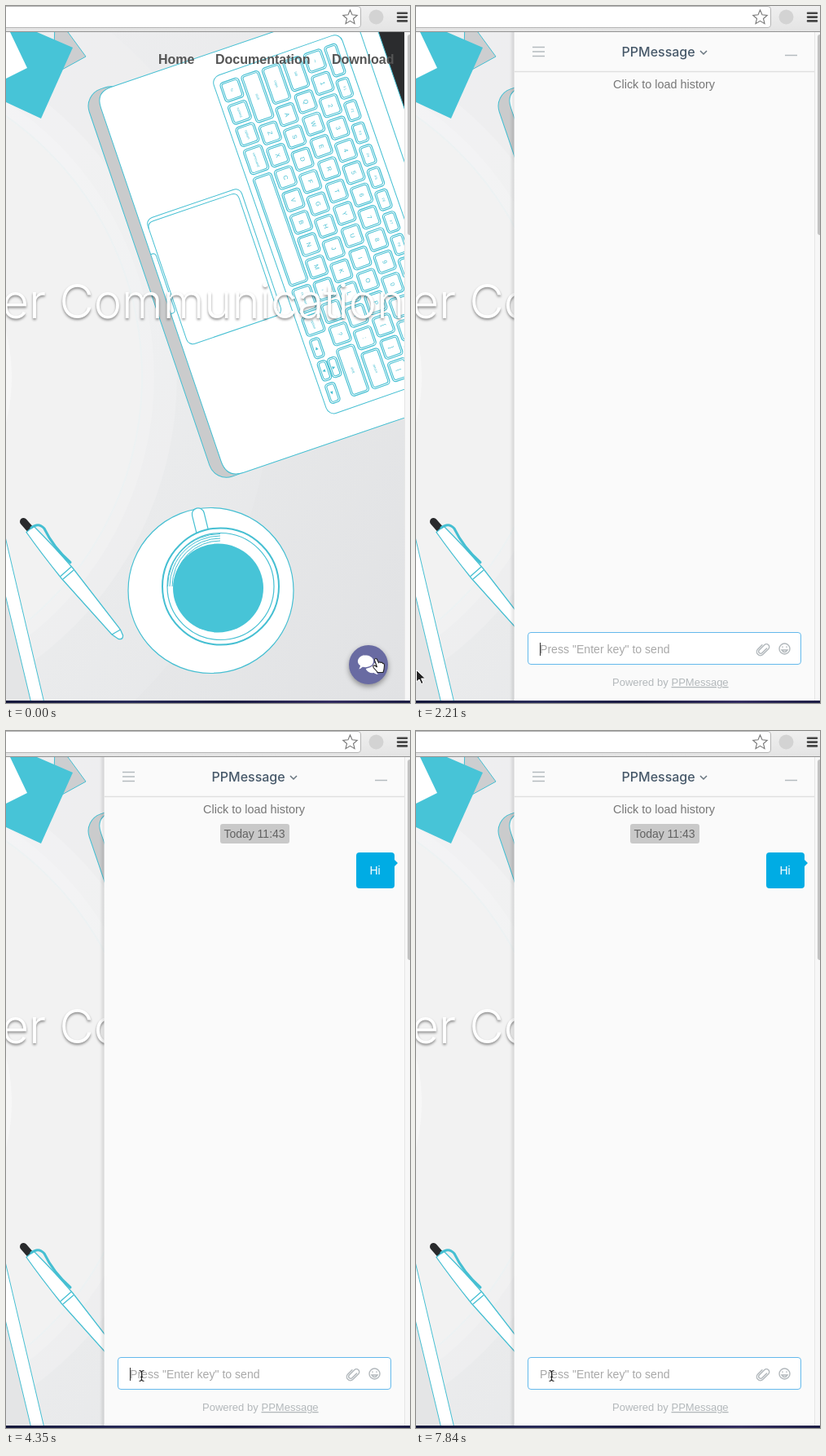
Recreate the animation shown at these times as an HTML page. Size 496 by 855 pixels, loop 8 s.

```html
<!DOCTYPE html>
<html lang="en">
<head>
<meta charset="utf-8">
<title>Chat widget</title>
<style>
html, body { margin: 0; width: 100%; height: 100%; overflow: hidden; background: #fff; }
svg { display: block; width: 100vw; height: 100vh; font-family: "Liberation Sans", Arial, sans-serif; font-size: 14px; }
.line { fill: none; stroke: #45bfd2; }
.paper { fill: #fff; stroke: #45bfd2; }
.nav { font-weight: bold; font-size: 16px; fill: #555; }
.hero { font: 300 58px Inter, "Liberation Sans", sans-serif; fill: #fff; filter: drop-shadow(0 2px 1.5px rgba(0,0,0,.42)); }
.brand { font: 500 16px Inter, "Liberation Sans", sans-serif; fill: #47596a; }
.label { fill: #45bfd2; text-anchor: middle; }
.icon { fill: none; stroke: #b2b8bc; stroke-width: 1.4; stroke-linecap: round; }
.mid { text-anchor: middle; }

.hand, .arrow, .beam, .panel, .picked, .chat, .hint, .caret, .key1, .key2, .sent {
  animation: 8s step-end infinite;
}
.hand { animation-name: hand; }
.arrow { animation-name: arrow; }
.beam { animation-name: beam; }
.panel { animation-name: panel; }
.picked { animation-name: picked; }
.chat { animation-name: chat; }
.hint { animation-name: hint; }
.caret { animation-name: caret; }
.key1 { animation-name: key1; }
.key2 { animation-name: key2; }
.sent { animation-name: sent; }

@keyframes hand {
  0% { opacity: 1; transform: none; }
  13.5% { opacity: 1; transform: translate(-2px, 2px); }
  21%, 100% { opacity: 0; }
}
@keyframes arrow {
  0% { opacity: 0; }
  24.25% { opacity: 1; transform: translate(-8px, 830px); }
  27.625% { opacity: 1; transform: translate(0, 814px); }
  30.875% { opacity: 1; transform: translate(91px, 795px); }
  34.25%, 100% { opacity: 0; }
}
@keyframes beam {
  0% { opacity: 0; }
  34.25% { opacity: 1; transform: translate(0, 2px); }
  37.625%, 100% { opacity: 1; transform: none; }
}
@keyframes panel { 0% { opacity: 0; } 24.25%, 100% { opacity: 1; } }
@keyframes picked { 0% { opacity: 1; } 27.625%, 100% { opacity: 0; } }
@keyframes chat { 0% { opacity: 0; } 27.625%, 100% { opacity: 1; } }
@keyframes hint { 0%, 54.375%, 100% { opacity: 1; } 47.625% { opacity: 0; } }
@keyframes key1 { 0%, 54.375%, 100% { opacity: 0; } 47.625% { opacity: 1; } }
@keyframes key2 { 0%, 54.375%, 100% { opacity: 0; } 51% { opacity: 1; } }
@keyframes sent { 0% { opacity: 0; } 54.375%, 100% { opacity: 1; } }
@keyframes caret {
  0%, 37.625%, 54.375%, 67.875%, 77.875%, 91.25% { opacity: 1; transform: none; }
  34.25%, 44.25%, 61.125%, 71.25%, 84.625%, 98%, 100% { opacity: 0; transform: none; }
  47.625% { opacity: 1; transform: translate(10px, 0); }
  51% { opacity: 1; transform: translate(13px, 0); }
}
</style>
</head>
<body>
<svg viewBox="0 0 496 855" preserveAspectRatio="none">
  <defs>
    <linearGradient id="desk" x1="0" y1="0" x2="1" y2="1">
      <stop offset="0" stop-color="#eeeef0"/><stop offset=".45" stop-color="#e9eaeb"/><stop offset="1" stop-color="#e1e2e4"/>
    </linearGradient>
    <linearGradient id="bar" x1="0" y1="0" x2="0" y2="1">
      <stop offset="0" stop-color="#efefef"/><stop offset="1" stop-color="#e4e4e4"/>
    </linearGradient>
    <linearGradient id="dock">
      <stop offset="0" stop-color="#15183a"/><stop offset=".3" stop-color="#272a58"/><stop offset=".55" stop-color="#191a40"/><stop offset=".8" stop-color="#322c60"/><stop offset="1" stop-color="#1c1d44"/>
    </linearGradient>
    <linearGradient id="edge">
      <stop offset="0" stop-color="#000" stop-opacity="0"/><stop offset="1" stop-color="#000" stop-opacity=".13"/>
    </linearGradient>
    <clipPath id="page"><rect y="32" width="489" height="820"/></clipPath>
  </defs>

  <rect width="496" height="855" fill="#fff"/>

  <g clip-path="url(#page)">
    <rect y="32" width="489" height="820" fill="url(#desk)"/>
    <g fill="#fff">
      <circle cx="-223" cy="455" r="550" opacity=".08"/>
      <circle cx="-223" cy="455" r="433" opacity=".16"/>
      <circle cx="-223" cy="455" r="405" opacity=".14"/>
    </g>
    <circle cx="-223" cy="455" r="390" fill="#f2f2f2" stroke="#edf2f3" stroke-width="2"/>
    <circle cx="-223" cy="455" r="230" fill="#f7f7f7"/>

    <!-- sheets -->
    <path d="M60 20 76 32 98 62 58 84Z" fill="#cdced0" stroke="#45bfd2"/>
    <path d="M0 20 38 32 82 51 43 138 0 118Z" fill="#47c4d7"/>
    <path d="M0 32H5L26 76 0 89Z" fill="#fff"/>
    <path d="M0 727V852H31Z" fill="#e4e5e6"/>
    <path class="paper" d="M-1 651 46.500 853H30.500L-1 722Z"/>

    <!-- laptop -->
    <g transform="translate(110 106) rotate(-18.800)">
      <rect x="352" y="-80" width="200" height="700" fill="#2b2c2e"/>
      <rect x="-15" y="-2" width="50" height="502" rx="22" fill="#cacbcc" stroke="#45bfd2"/>
      <path class="paper" d="M352.500 0H20Q0 0 0 20V478Q0 500 22 500H352.500Z"/>
      <path class="line" d="M331.500 0V500"/>
      <path class="line" d="M0 210H3Q6 211 6 215V283Q6 287 2 287H0"/>
      <rect class="paper" x="8" y="167.500" width="122" height="163.500" rx="8"/>
      <path class="line" d="M8 180Q8 172 16 172H117Q125 172 125 180V331"/>
    </g>
    <g id="keys" transform="translate(252 88) rotate(-19.200)"></g>

    <!-- pen -->
    <path d="M21.500 632.500 28.500 640.500" stroke="#292a2c" stroke-width="9" stroke-linecap="round"/>
    <path class="paper" stroke-width="1.300" d="M25 645.500 34 638Q60 664 82 689.500L140.500 765 143.500 772Q144 777.500 138 776.500L130 771 68 702Q43 671 25 645.500Z"/>
    <path class="line" stroke-width="1.300" d="M67 699.500 80 688M70 703 83 692M130 771 140.500 765"/>
    <path class="line" stroke-width="3" stroke-linecap="round" d="M31 640Q40 633 47 641 58 664 79 682.500"/>

    <!-- cup -->
    <g class="paper">
      <circle cx="251.500" cy="717" r="101.500" stroke-width="1.200"/>
      <rect x="228" y="616" width="15" height="46" rx="7.500" stroke-width="1.200" transform="rotate(-14 235 622)"/>
      <circle cx="263.500" cy="712" r="71.500" stroke-width="2"/>
      <circle cx="263.500" cy="712" r="65.500" stroke-width="1.200"/>
    </g>
    <path class="line" d="M201 712A62 62 0 0 1 263 650M204 712A59 59 0 0 1 263 653M207 712A56 56 0 0 1 263 656M198.500 712A64.500 64.500 0 0 1 263 647.500"/>
    <ellipse cx="260.500" cy="714" rx="55.500" ry="54.500" fill="#47c4d7"/>

    <g class="nav">
      <text x="187" y="71">Home</text>
      <text x="257" y="71">Documentation</text>
      <text x="400" y="71">Download</text>
    </g>
    <g class="hero">
      <text x="49" y="383" text-anchor="end">er</text>
      <text x="65.500" y="383">Communication</text>
    </g>

    <!-- chat button -->
    <circle cx="445" cy="808" r="24" fill="#696ba2" style="filter: drop-shadow(0 3px 3px rgba(0,0,0,.38))"/>
    <g fill="#fff" stroke="#696ba2" stroke-width="1.400">
      <path d="M449 805A8.500 7 0 0 1 455.500 817Q457 819 458.500 820.500 454.500 821 451.500 818.800A9 7.500 0 0 1 441 813Z"/>
      <path d="M441.500 795.500A10.500 8.200 0 1 1 438 811.500Q435 814.500 431.500 814.500 434 812 434.300 809.500A10.500 8.200 0 0 1 441.500 795.500Z"/>
    </g>
    <path class="hand" d="M454.500 808 452.500 802.500Q452.500 800.500 454 800.500T456 802.500L457.500 805.500Q459 804 460 805.500 462 804.500 462.500 806.500 464.500 806 464.500 809L464 814 463 817.500H456.500L451.500 812Q450 809.500 451.500 809 453 808.500 455.500 811Z" fill="#fff" stroke="#222" stroke-width="1.100"/>

    <!-- chat panel -->
    <g class="panel">
      <rect x="115" y="32" width="6" height="820" fill="url(#edge)"/>
      <rect x="120.500" y="32" width="369" height="820" fill="#fafafa"/>
      <path d="M121 80.500H489" stroke="#dfdfdf" stroke-width="1.500"/>
      <path d="M143 50.500H158M143 56H158M143 61.500H158M453 60.500H468" stroke="#b4babe" stroke-width="1.600"/>
      <rect class="picked" x="252" y="46" width="91" height="19" fill="#aed8fd"/>
      <text class="brand" x="252.500" y="62">PPMessage</text>
      <path d="M349 55 353 59 357 55" fill="none" stroke="#68757f" stroke-width="1.500"/>

      <g class="chat">
        <text class="mid" x="304.500" y="101" fill="#777" font-size="14.400">Click to load history</text>
        <g class="sent">
          <rect x="263" y="114" width="85" height="24" rx="3" fill="#c9c9c9"/>
          <text class="mid" x="305" y="131" fill="#626262">Today 11:43</text>
          <rect x="430" y="149" width="47" height="44" rx="4" fill="#00ace4"/>
          <path d="M476 157 481 162 476 167Z" fill="#00ace4"/>
          <text x="446.500" y="176" fill="#fff">Hi</text>
        </g>
        <rect x="137.500" y="768.500" width="335" height="39" rx="3.500" fill="#fff" stroke="#64b9ec"/>
        <text class="hint" x="152" y="794" fill="#a9a9a9" font-size="14.100">Press "Enter key" to send</text>
        <text class="key1" x="152" y="794" fill="#555">H</text>
        <text class="key2" x="162.100" y="794" fill="#555">i</text>
        <rect class="caret" x="152" y="781" width="1" height="16" fill="#333"/>
        <path class="icon" transform="translate(426 789) rotate(45)" d="M2.500-4V4A2.500 2.500 0 0 1-2.500 4V-5A3.500 3.500 0 0 1 4.500-5V4.500A4.500 4.500 0 0 1-4.500 4.500V-3"/>
        <circle class="icon" cx="452.500" cy="788.500" r="6.500"/>
        <path class="icon" d="M449 790Q452.500 795 456 790ZM450 786V786.500M455 786V786.500"/>
        <g font-size="13" fill="#b3b8bb">
          <text x="241" y="834">Powered by</text>
          <text x="313.500" y="834" text-decoration="underline">PPMessage</text>
        </g>
      </g>
    </g>

    <path class="arrow" d="M.5.500V15L4 12 6.500 17.500 9 16.500 6.500 11H11.500Z" fill="#222" stroke="#fff"/>
    <path class="beam" d="M163.500 784.500Q166.500 784.500 166.500 787 166.500 784.500 169.500 784.500M166.500 787V795M163.500 797.500Q166.500 797.500 166.500 795 166.500 797.500 169.500 797.500M165 792.500H168" fill="none" stroke="#222" stroke-width="1.100"/>
  </g>

  <!-- browser frame -->
  <rect width="496" height="31" fill="url(#bar)"/>
  <path d="M-2 .5H432Q435.500.500 435.500 4V23Q435.500 26.500 432 26.500H-2Z" fill="#fff" stroke="#b4b4b4"/>
  <path d="M0 31.500H496" stroke="#929292"/>
  <path d="M422.500 5 425 10.800 431.200 11.400 426.500 15.500 428 21.700 422.500 18.400 417 21.700 418.500 15.500 413.800 11.400 420 10.800Z" fill="#fff" stroke="#777" stroke-width="1.100"/>
  <circle cx="454.500" cy="13.500" r="9" fill="#d3d3d3"/>
  <path d="M481 8.800H492M481 13.600H492M481 18.400H492" stroke="#454545" stroke-width="2.600" stroke-linecap="round"/>
  <rect x="489" y="32" width="7" height="820" fill="#f7f7f7"/>
  <path d="M489.500 32V852" stroke="#e6e6e6"/>
  <rect x="493" y="35" width="6" height="246" rx="3" fill="#c3c3c3"/>
  <rect y="852" width="496" height="3" fill="url(#dock)"/>
</svg>

<script>
const UNIT = 29, GAP = 4, TOP = 8;
const parts = ['<rect class="paper" width="167" height="439" rx="10"/>'];

function box(x, y, w, h, r, weight) {
  return `<rect class="line" x="${x}" y="${y}" width="${w}" height="${h}" rx="${r}" stroke-width="${weight}"/>`;
}

function key(x, y, w, h, label) {
  const size = label.length > 1 ? 4.2 : 7.5;
  const cx = x + w / 2 - size * 0.35, cy = y + h / 2;
  parts.push(box(x, y, w, h, 4, 1.2), box(x + 2, y + 2, w - 4, h - 4, 2.5, 1),
    `<text class="label" font-size="${size}" transform="translate(${cx} ${cy}) rotate(90)">${label}</text>`);
}

// Each entry is "label" or "label/width"; an underscore leaves the cap blank.
function row(x, w, keys) {
  let y = TOP;
  for (const entry of keys.split(' ')) {
    const [label, units = 1] = entry.split('/');
    key(x, y + GAP / 2, w, units * UNIT - GAP, label === '_' ? '' : label);
    y += units * UNIT;
  }
}

row(7, 24, 'fn control option command/1.25 _/5 command/1.25 option');
row(34.5, 23, 'shift/2.25 Z X C V B N M , . ? shift/2.25');
row(61.5, 23, 'caps/1.75 A S D F G H J K L ; : return/1.75');
row(88.5, 23, 'tab/1.5 Q W E R T Y U I O P [ ] |');
row(115.5, 23, '~ 1 2 3 4 5 6 7 8 9 0 - = delete/1.5');
row(142.5, 16, 'esc/1.5 F1 F2 F3 F4 F5 F6 F7 F8 F9 F10 F11 F12 _');

const pad = TOP + 11.5 * UNIT + GAP / 2, cap = UNIT - GAP;
key(7, pad, 13, cap, '◂');
key(7, pad + UNIT, 12, cap, '▾');
key(20, pad + UNIT, 12, cap, '▴');
key(7, pad + 2 * UNIT, 13, cap, '▸');

document.getElementById('keys').innerHTML = parts.join('');
</script>
</body>
</html>
```
